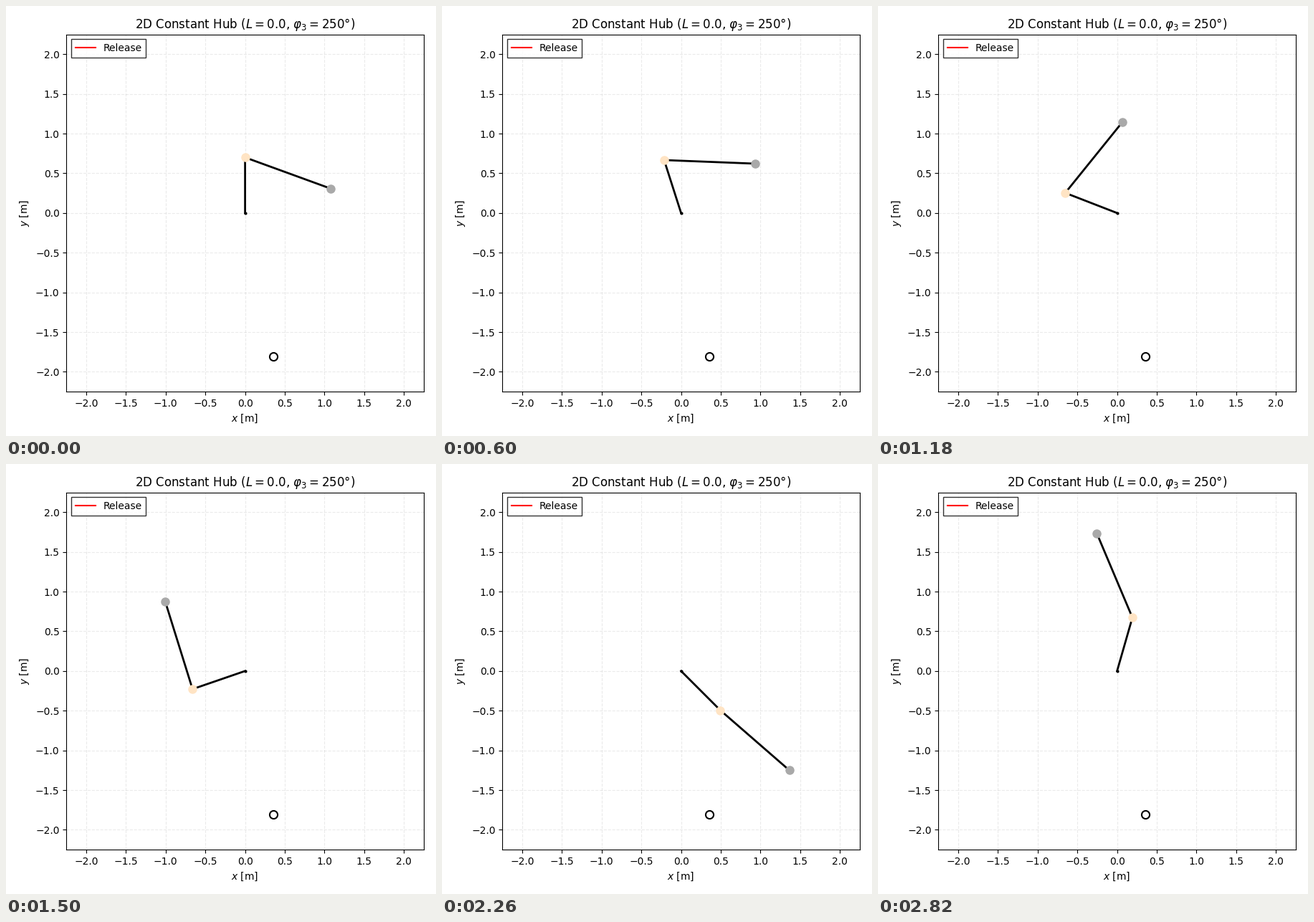
Recreate the animation shown at these times as a matplotlib script. Size 600 by 600 pixels, loop 2.84 s.

```python
import numpy as np
import matplotlib.pyplot as plt
from matplotlib.animation import FuncAnimation

FRAMES, STEP_MS = 142, 20
ARM, CLUB = 0.7, 1.15
BALL = (0.356, -1.807)
HUB_ACC = 98.6  # arm acceleration while the wrist is held [deg/s^2]
RELEASE = 1.0   # moment the wrist opens [s]

# After release: time, arm angle from vertical and its speed,
# club angle from the x axis and its speed [s, deg, deg/s]
POSES = np.array([
    (1.00, 49.3, 98.6, 29.3, 98.6),
    (1.18, 68.8, 116, 51.1, 143),
    (1.50, 109.0, 136, 107.3, 210),
    (1.82, 155.2, 152, 185.8, 276),
    (2.26, 225.0, 175, 319.0, 312),
    (2.82, 344.0, 252, 472.9, 204),
])


def hermite(t, knots, values, speeds):
    """Cubic curve through the values with the given speeds at the knots."""
    i = np.clip(np.searchsorted(knots, t) - 1, 0, len(knots) - 2)
    h = knots[i + 1] - knots[i]
    u = (t - knots[i]) / h
    ease = u * u * (3 - 2 * u)
    return (values[i] + (values[i + 1] - values[i]) * ease
            + h * u * (1 - u) * (speeds[i] * (1 - u) - speeds[i + 1] * u))


def polar(length, degrees):
    a = np.radians(degrees)
    return length * np.column_stack([np.cos(a), np.sin(a)])


t = np.arange(FRAMES) * STEP_MS / 1000
knots, arm_at, arm_speed, club_at, club_speed = POSES.T
turn = HUB_ACC * t**2 / 2
held = t < RELEASE
arm = np.where(held, turn, hermite(t, knots, arm_at, arm_speed))
club = np.where(held, turn - 20, hermite(t, knots, club_at, club_speed))
joint = polar(ARM, arm + 90)
head = joint + polar(CLUB, club)

fig = plt.figure(figsize=(6, 6), dpi=100)
ax = fig.add_axes([84.3 / 600, 61.85 / 600, 498.6 / 600, 498.6 / 600])
ax.set(xlim=(-2.25, 2.25), ylim=(-2.25, 2.25),
       xlabel="$x$ [m]", ylabel="$y$ [m]")
ticks = np.arange(-2, 2.1, 0.5)
ax.set_xticks(ticks)
ax.set_yticks(ticks)
ax.set_title(r"2D Constant Hub ($L = 0.0$, $\varphi_3 = 250$°)")
ax.grid(linestyle="--", alpha=0.25)

ax.plot([], [], color="red", label="Release")
ax.legend(loc="upper left", fancybox=False, edgecolor="black")

ax.plot(*BALL, "o", ms=8, mfc="white", mec="black", mew=1.5)
ax.plot(0, 0, "o", color="black", ms=2)
links, = ax.plot([], [], color="black", lw=2)
wrist, = ax.plot([], [], "o", color="bisque", ms=8)
tip, = ax.plot([], [], "o", color="darkgray", ms=8)


def update(i):
    (jx, jy), (hx, hy) = joint[i], head[i]
    links.set_data([0, jx, hx], [0, jy, hy])
    wrist.set_data([jx], [jy])
    tip.set_data([hx], [hy])
    return links, wrist, tip


anim = FuncAnimation(fig, update, frames=FRAMES, interval=STEP_MS,
                     repeat=True, repeat_delay=0)
plt.show()
```
